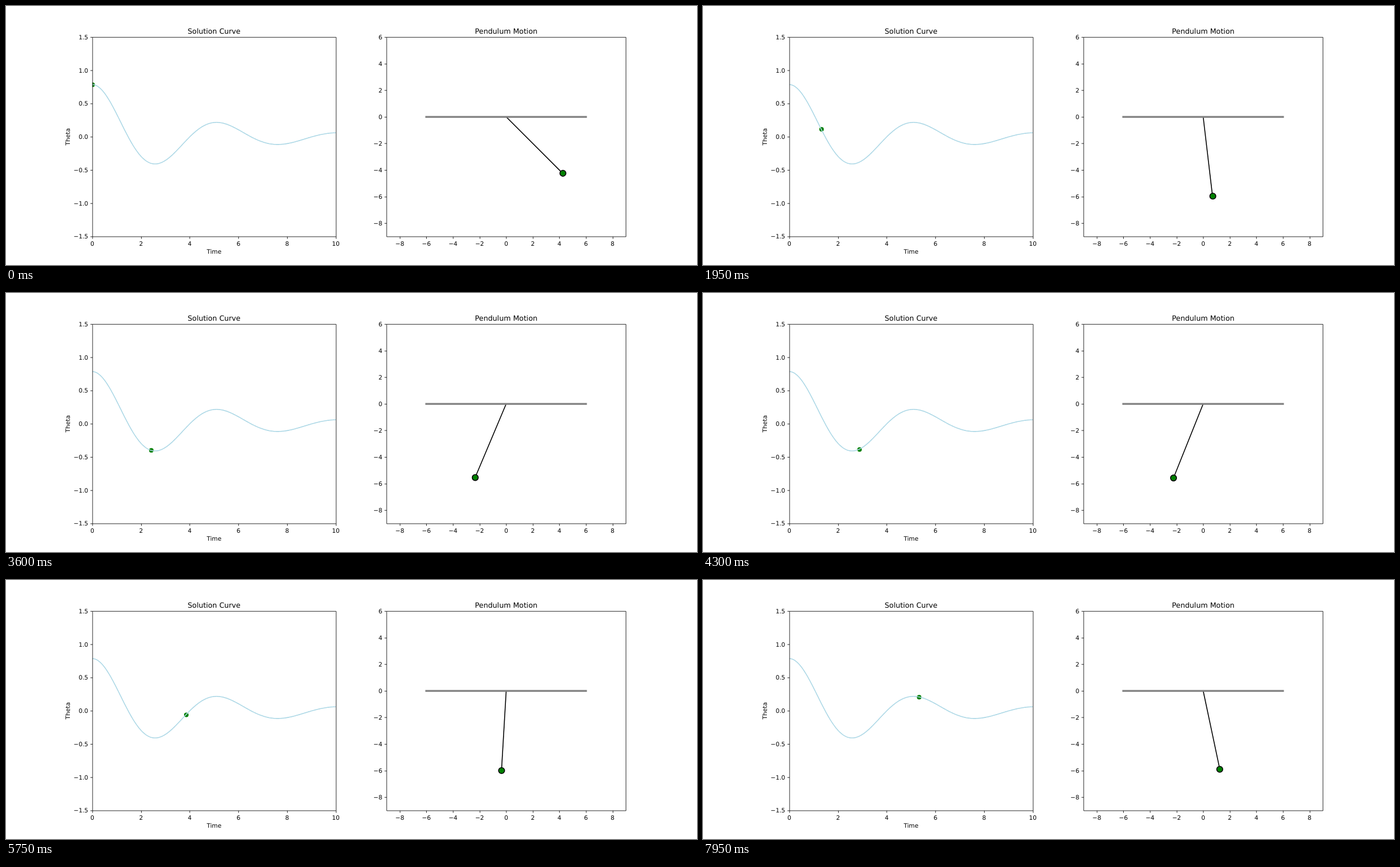
An HTML page for the animation above (8000 ms loop, 1222 by 458 pixels).

```html
<!DOCTYPE html>
<html lang="en">
<head>
<meta charset="utf-8">
<title>Damped pendulum</title>
<style>
  html, body { margin: 0; width: 100%; height: 100%; overflow: hidden; background: #fff; }
  svg { display: block; }
  text { font: 13.89px "DejaVu Sans", sans-serif; fill: #000; text-rendering: geometricPrecision; }
  .title { font-size: 16.67px; }
  .mid { text-anchor: middle; }
  .end { text-anchor: end; }
  .axis { fill: none; stroke: #000; stroke-width: 1.11; }
</style>
</head>
<body>
<!-- laid out as a 16 x 6 inch figure at 100 units per inch -->
<svg width="1222" height="458" viewBox="0 0 1600 600" preserveAspectRatio="none">
  <defs><clipPath id="clip"><rect x="200" y="72" width="563.64" height="462"/></clipPath></defs>
  <g clip-path="url(#clip)">
    <circle id="dot" r="5.2" fill="#008000"/>
    <path id="curve" fill="none" stroke="#add8e6" stroke-width="2.08" stroke-linejoin="round"/>
  </g>
  <line id="rod" stroke="#000" stroke-width="2.08" stroke-linecap="square"/>
  <line id="bar" stroke="#808080" stroke-width="4.17" stroke-linecap="square"/>
  <circle id="bob" r="6.94" fill="#008000" stroke="#000" stroke-width="2.08"/>
  <g id="axes"></g>
</svg>
<script>
const NS = 'http://www.w3.org/2000/svg';
const $ = id => document.getElementById(id);

function set(el, attrs) {
  for (const k in attrs) el.setAttribute(k, attrs[k]);
  return el;
}

function add(tag, attrs, text) {
  const el = set(document.createElementNS(NS, tag), attrs);
  if (text !== undefined) el.textContent = text;
  $('axes').appendChild(el);
}

const TOP = 72, HEIGHT = 462;

function makePlot(left, width, x0, x1, y0, y1) {
  return {
    left, width,
    x: v => left + (v - x0) / (x1 - x0) * width,
    y: v => TOP + (y1 - v) / (y1 - y0) * HEIGHT
  };
}

const chart = makePlot(200, 563.64, 0, 10, -1.5, 1.5);
const scene = makePlot(880.98, 554.4, -9, 9, -9, 6);

// lines and markers sit on the middle of a unit cell
const snap = v => Math.floor(v + 0.5) + 0.5;
const label = (v, digits) => v.toFixed(digits).replace('-', '\u2212');

function range(from, to, step) {
  const out = [];
  for (let v = from; v <= to + 1e-9; v += step) out.push(v);
  return out;
}

function drawAxes(plot, title, xs, ys, digits) {
  const l = snap(plot.left), r = snap(plot.left + plot.width);
  const t = snap(TOP), b = snap(TOP + HEIGHT);
  let d = `M${l} ${t}H${r}V${b}H${l}Z`;
  for (const v of xs) {
    const x = plot.x(v);
    d += `M${snap(x)} ${b}v5`;
    add('text', { x, y: 555, class: 'mid' }, label(v, 0));
  }
  for (const v of ys) {
    const y = snap(plot.y(v));
    d += `M${l} ${y}h-5`;
    add('text', { x: plot.left - 9.72, y: y + 4.5, class: 'end' }, label(v, digits));
  }
  add('path', { d, class: 'axis' });
  add('text', { x: plot.left + plot.width / 2, y: 64, class: 'title mid' }, title);
}

// theta'' = -DAMP theta' - G / LEN sin(theta), solved with Runge-Kutta
const G = 9.81, LEN = 6, DAMP = 0.5, COUNT = 300, DT = 10 / (COUNT - 1);

function solve() {
  const slope = ([a, w]) => [w, -DAMP * w - G / LEN * Math.sin(a)];
  const move = (s, k, h) => [s[0] + k[0] * h, s[1] + k[1] * h];
  const out = [];
  let s = [Math.PI / 4, 0];
  for (let i = 0; i < COUNT; i++) {
    out.push(s[0]);
    const k1 = slope(s);
    const k2 = slope(move(s, k1, DT / 2));
    const k3 = slope(move(s, k2, DT / 2));
    const k4 = slope(move(s, k3, DT));
    s = s.map((v, j) => v + DT / 6 * (k1[j] + 2 * k2[j] + 2 * k3[j] + k4[j]));
  }
  return out;
}

const theta = solve();
const pivot = { x: scene.x(0), y: scene.y(0) };

drawAxes(chart, 'Solution Curve', range(0, 10, 2), range(-1.5, 1.5, 0.5), 1);
drawAxes(scene, 'Pendulum Motion', range(-8, 8, 2), range(-8, 6, 2), 0);
add('text', { x: chart.left + chart.width / 2, y: 574, class: 'mid' }, 'Time');
add('text', { transform: 'translate(148 303) rotate(-90)', class: 'mid' }, 'Theta');

set($('curve'), {
  d: 'M' + theta.map((a, i) => chart.x(i * DT).toFixed(2) + ' ' + chart.y(a).toFixed(2)).join('L')
});
set($('bar'), {
  x1: Math.round(scene.x(-6)), x2: Math.round(scene.x(6)),
  y1: Math.round(pivot.y), y2: Math.round(pivot.y)
});

const STEP = 50, LOOP = 8000;

function render(ms) {
  const i = Math.floor((ms % LOOP) / STEP);
  const a = theta[i];
  const x = scene.x(LEN * Math.sin(a)), y = scene.y(-LEN * Math.cos(a));
  set($('dot'), { cx: snap(chart.x(i * DT)), cy: snap(chart.y(a)) });
  set($('rod'), { x1: pivot.x, y1: pivot.y, x2: x, y2: y });
  set($('bob'), { cx: snap(x), cy: snap(y) });
}

const start = performance.now();
function tick() {
  render(performance.now() - start);
  requestAnimationFrame(tick);
}
render(0);
requestAnimationFrame(tick);
</script>
</body>
</html>
```
